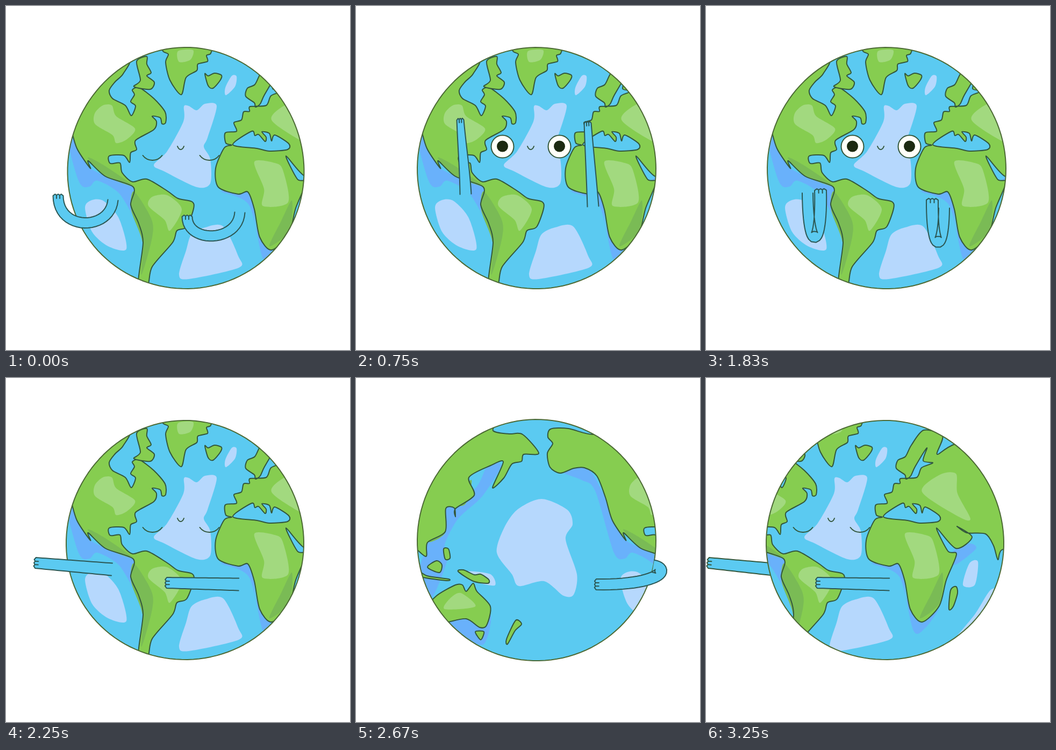
An HTML page with a canvas that plays this animation: 640x640 px, repeating every 3330 ms.

```html
<!DOCTYPE html>
<html lang="en">
<head>
<meta charset="utf-8">
<title>Dancing globe</title>
<style>
html, body { margin: 0; height: 100%; overflow: hidden; background: #fff; }
canvas { display: block; width: 100%; height: 100%; object-fit: contain; }
</style>
</head>
<body>
<canvas id="stage" width="640" height="640"></canvas>
<script>
const ctx = document.getElementById('stage').getContext('2d');
const LOOP = 3330, STEP = 250 / 3, WORLD = 920, SPIN_START = 27, SPIN_STEP = 69;
const SEA = '#5bcaf1', SEA_LIGHT = '#b6d8fd', SEA_DARK = '#69b1fb';
const LAND = '#86cd50', LAND_LIGHT = '#a2d97f', LAND_DARK = '#7abb55', INK = '#33573c';

// Smooth closed path through "x,y x,y ..." points, moved by dx.
function blob(text, dx) {
  const p = text.trim().split(/\s+/).map(s => s.split(',').map(Number)).map(([x, y]) => [x + dx, y]);
  const n = p.length, at = i => p[(i + n) % n], path = new Path2D();
  path.moveTo(...p[0]);
  for (let i = 0; i < n; i++) {
    const a = at(i - 1), b = at(i), c = at(i + 1), d = at(i + 2);
    path.bezierCurveTo(b[0] + (c[0] - a[0]) / 7, b[1] + (c[1] - a[1]) / 7,
      c[0] - (d[0] - b[0]) / 7, c[1] - (d[1] - b[1]) / 7, ...c);
  }
  path.closePath();
  return path;
}

// A slightly uneven circle; three of them alternate for the hand-drawn wobble.
function roundish(cx, cy, rx, ry, bulge) {
  const path = new Path2D();
  for (let a = 0; a < 2 * Math.PI; a += 0.05) {
    const r = 1 + bulge * Math.sin(3 * a);
    path.lineTo(cx + rx * r * Math.cos(a), cy + ry * r * Math.sin(a));
  }
  path.closePath();
  return path;
}
const globes = [
  roundish(334.5, 303, 220, 224.5, 0.007),
  roundish(333, 303, 221, 222.5, 0.007),
  roundish(336, 302, 222, 224.5, 0.002)
];

// Offsets of the three map regions: Atlantic, Indian Ocean, Pacific.
const ATL = 0, IND = 92, PAC = -345;
const map = [];
const add = (dx, fill, ink, ...shapes) => shapes.forEach(s => map.push({ path: blob(s, dx), fill, ink }));

const americas = `228,96 150,88 97,105 50,94 17,95 12,110 21,122 11,140 16,166 35,177 60,168 80,167 103,182
  119,222 132,265 157,302 153,288 185,317 237,337 232,370 247,405 255,440 246,517 264,518 272,485 310,440
  318,418 336,411 349,377 346,364 320,358 300,344 262,322 235,327 216,310 212,292 194,293 192,279 219,278
  230,291 232,273 243,267 241,250 275,230 280,215 272,205 287,208 290,219 297,217 296,197 275,172 248,152
  235,156 239,165 232,178 241,186 233,204 222,185 198,172 192,157 203,141 218,126`;
const oldWorld = `405,97 382,125 371,146 357,153 354,168 370,180 372,188 381,182 389,165 411,130 404,154 422,158
  401,167 392,185 362,187 361,196 350,197 346,212 332,217 337,233 316,236 317,255 328,259 314,264 298,302
  303,337 340,350 358,346 370,378 380,430 402,454 434,424 447,376 466,328 450,322 429,279 465,317 495,296
  467,276 485,288 520,290 535,312 543,338 550,320 585,312 613,332 616,306 649,286 650,243 666,242 668,258
  668,243 703,218 693,185 733,163 757,156 737,204 758,186 773,160 791,155 795,142 823,140 793,105 768,104
  738,98 738,70 600,76 465,122 430,142 440,108`;
const greenland = `292,84 302,90 297,105 305,138 326,165 335,133 355,120 357,108 375,103 373,92 381,88 378,70 296,70`;
const australia = `130,430 150,405 185,385 198,385 205,397 218,382 225,397 250,425 243,460 230,464 205,448 167,455 130,460`;
const lands = [[ATL, americas], [IND, oldWorld], [ATL, greenland], [PAC, australia]];

// Water tones
add(ATL, SEA_LIGHT, 0,
  `331,187 340,186 355,194 370,182 392,186 375,245 368,262 380,285 380,330 355,337 295,308 275,296 300,270 330,215`,
  '420,130 429,131 426,150 409,166 408,152',
  '345,425 370,412 404,410 432,465 433,487 340,508 322,500 335,455',
  '147,375 160,361 182,363 210,395 224,452 190,447 160,420');
add(IND, SEA_LIGHT, 0,
  '490,345 506,342 500,385 478,385',
  '530,394 552,400 480,488 460,490 500,440');
add(PAC, SEA_LIGHT, 0,
  '275,280 300,245 345,225 393,245 403,272 390,300 411,365 405,403 386,405 350,378 303,387 290,365 262,325',
  '205,360 250,365 258,386 220,378');
add(ATL, SEA_DARK, 0,
  `40,175 85,167 120,225 155,300 237,337 233,370 242,400 210,348 170,325 155,336 135,325 100,210 75,190`,
  '400,345 455,348 465,410 492,455 525,430 500,465 478,470 452,370');
add(IND, SEA_DARK, 0, '460,322 490,308 502,318 462,348');
add(PAC, SEA_DARK, 0,
  '160,245 222,205 245,163 270,163 235,220 190,262 165,310 172,332 140,410 112,380',
  '167,455 205,446 250,440 238,495 200,482');

// Land fills, then their tones, then the coasts
for (const [dx, shape] of lands) add(dx, LAND, 0, shape);
add(ATL, LAND_LIGHT, 0,
  '180,185 197,185 205,205 240,228 225,248 205,255 198,240 166,220 165,200',
  '272,355 300,352 327,378 305,418 295,398 265,372',
  '462,290 500,292 515,305 525,365 478,372 480,340',
  '320,84 348,82 343,100 322,104');
add(IND, LAND_LIGHT, 0, '435,180 465,178 468,215 492,262 470,258 402,212');
add(PAC, LAND_LIGHT, 0, '175,410 195,400 222,425 165,430');
add(ATL, LAND_DARK, 0,
  '238,345 270,395 272,430 252,500 254,440 233,380',
  '152,282 180,295 237,335 185,316',
  '512,400 532,362 527,418 490,447');
add(PAC, LAND_DARK, 0, '150,215 190,210 215,190 203,235 166,242 166,288 135,305 150,270');
for (const [dx, shape] of lands) add(dx, null, 1, shape);

// Islands and the inland sea
add(ATL, LAND, 1,
  '243,103 262,94 262,108 270,124 262,130 276,142 268,155 238,150 250,138',
  '370,126 376,130 388,125 401,129 398,139 385,153 376,148');
add(IND, SEA, 1,
  `330,258 365,233 371,241 378,239 390,252 392,244 384,234 398,237 402,251 408,240 434,256 432,267 398,270 375,265`);
add(IND, LAND, 1, '455,395 465,388 468,400 460,425 452,430');
add(PAC, LAND, 1,
  '190,360 200,357 220,366 232,365 247,375 245,382 218,378',
  '222,472 238,472 232,487',
  '297,451 308,458 296,470 282,495 280,486',
  '163,318 172,318 175,335 166,337',
  '133,352 150,340 160,348 155,362',
  '116,358 132,368 172,374 168,377 122,370');

// Arm poses: shoulder and hand widths, then shoulder, two controls and hand of each arm.
const swing = [19, 19, 199, 361, 194, 418, 97, 420, 97, 353, 435, 384, 432, 440, 337, 442, 337, 392];
const up = [21, 13, 204, 350, 202, 300, 197, 260, 194, 212, 441, 373, 438, 320, 434, 270, 431, 218];
const down = [23, 20, 196, 351, 222, 385, 239, 415, 236, 474, 427, 366, 455, 395, 471, 425, 467, 479];
const fold = [20, 22, 189, 348, 190, 460, 216, 455, 213, 343, 443, 376, 442, 462, 420, 462, 421, 361];
const drop = [22, 20, 196, 352, 200, 400, 200, 450, 198, 500, 436, 375, 438, 430, 440, 480, 440, 533];
const point = [23, 20, 197, 356, 150, 352, 100, 347, 55, 344, 433, 384, 390, 383, 345, 382, 299, 381];
const dance = [[0, swing], [9, up], [12.5, point], [16, down], [19, swing], [22, fold], [24.5, drop], [27, point]];
const mix = (a, b, u) => a.map((v, i) => v + (b[i] - v) * u);

function poseAt(k) {
  const next = dance.findIndex(([at]) => at > k);
  if (next < 0) return point;
  const [a, from] = dance[next - 1], [b, to] = dance[next];
  const u = (k - a) / (b - a);
  return mix(from, to, u * u * (3 - 2 * u));
}

// The pointing arm carried round by the spin; null while it is hidden.
function spinArm([sx, sy, , , , , hx, hy], shift) {
  const reach = sx - hx, leaving = shift < 500;
  const x = sx + (leaving ? shift : shift - WORLD);
  if (x > 600 || x < 20) return null;
  const behind = !leaving && x < 118;
  const wrap = Math.min(1, Math.max(0, (x - 490) / 52));
  const tip = leaving ? x - reach + 0.9 * Math.max(0, x - 490) : Math.max(x - reach, 5, 215 - 2 * x);
  const from = behind ? 125 : x, lerp = u => [from + (tip - from) * u, sy + (hy - sy) * u];
  const straight = [...lerp(0), ...lerp(1 / 3), ...lerp(2 / 3), ...lerp(1)];
  const bent = [Math.min(x + 11, 553), sy - 6, 588, sy, 560, sy + 30, tip, sy + 28];
  return { points: mix(straight, bent, wrap), behind };
}

function drawArm([x0, y0, x1, y1, x2, y2, x3, y3], w0, w1) {
  const left = [], right = [], n = 24;
  let tip, dir;
  for (let i = 0; i <= n; i++) {
    const t = i / n, s = 1 - t, w = (w0 + (w1 - w0) * t) / 2;
    const bez = (a, b, c, d) => s * s * s * a + 3 * s * s * t * b + 3 * s * t * t * c + t * t * t * d;
    const slope = (a, b, c, d) => s * s * (b - a) + 2 * s * t * (c - b) + t * t * (d - c);
    const dx = slope(x0, x1, x2, x3), dy = slope(y0, y1, y2, y3), len = Math.hypot(dx, dy) || 1;
    tip = [bez(x0, x1, x2, x3), bez(y0, y1, y2, y3)];
    dir = [dx / len, dy / len];
    left.push([tip[0] - dir[1] * w, tip[1] + dir[0] * w]);
    right.unshift([tip[0] + dir[1] * w, tip[1] - dir[0] * w]);
  }
  const hand = (along, side) => [tip[0] + dir[0] * along - dir[1] * side * w1,
    tip[1] + dir[1] * along + dir[0] * side * w1];
  ctx.beginPath();
  [...left, hand(3, 0.3), hand(1, 0.16), hand(3, 0), hand(1, -0.16), hand(3, -0.3), ...right]
    .forEach(p => ctx.lineTo(...p));
  ctx.fillStyle = SEA;
  ctx.fill();
  for (const side of [0.16, -0.16]) {
    ctx.moveTo(...hand(1, side));
    ctx.lineTo(...hand(-5, side));
  }
  ctx.stroke();
}

function arc(x, y, w, h) {
  ctx.beginPath();
  ctx.moveTo(x - w, y);
  ctx.bezierCurveTo(x - w / 2, y + h, x + w / 2, y + h, x + w, y);
  ctx.stroke();
}

function disc(x, y, r, fill) {
  ctx.beginPath();
  ctx.arc(x, y, r, 0, 7);
  ctx.fillStyle = fill;
  ctx.fill();
}

function drawMap(open) {
  for (const { path, fill, ink } of map) {
    if (fill) { ctx.fillStyle = fill; ctx.fill(path); }
    if (ink) ctx.stroke(path);
  }
  arc(325, 261, 6, 8);
  for (const x of [272.5, 378.5]) {
    if (open) {
      disc(x, 261.5, 21, '#fffff8');
      ctx.stroke();
      disc(x, 261, 10.5, '#1c2a10');
    } else arc(x, 278, 18, 12);
  }
}

function draw(k) {
  const spinning = k >= SPIN_START, shift = spinning ? (k - SPIN_START) * SPIN_STEP : 0;
  const [w0, w1, ...p] = poseAt(k);
  const arms = [p.slice(0, 8), p.slice(8)]
    .map(a => spinning ? spinArm(a, shift) : { points: a })
    .filter(Boolean);
  const paintArms = behind => arms.filter(a => !!a.behind === behind).forEach(a => drawArm(a.points, w0, w1));
  const globe = globes[Math.floor((k + 1) / 4) % 3];

  ctx.fillStyle = '#fff';
  ctx.fillRect(0, 0, 640, 640);
  ctx.strokeStyle = INK;
  ctx.lineWidth = 2;
  ctx.lineJoin = ctx.lineCap = 'round';
  paintArms(true);

  ctx.save();
  ctx.clip(globe);
  ctx.fillStyle = SEA;
  ctx.fillRect(0, 0, 640, 640);
  for (const copy of [0, -WORLD]) {
    ctx.save();
    ctx.translate(shift + copy, 0);
    drawMap(k >= 4 && k < 24);
    ctx.restore();
  }
  ctx.restore();

  ctx.strokeStyle = '#4c6a35';
  ctx.stroke(globe);
  ctx.strokeStyle = '#2c5753';
  paintArms(false);
}

function tick() {
  draw(Math.min(39, Math.floor((performance.now() % LOOP + 5) / STEP)));
  requestAnimationFrame(tick);
}
tick();
</script>
</body>
</html>
```
